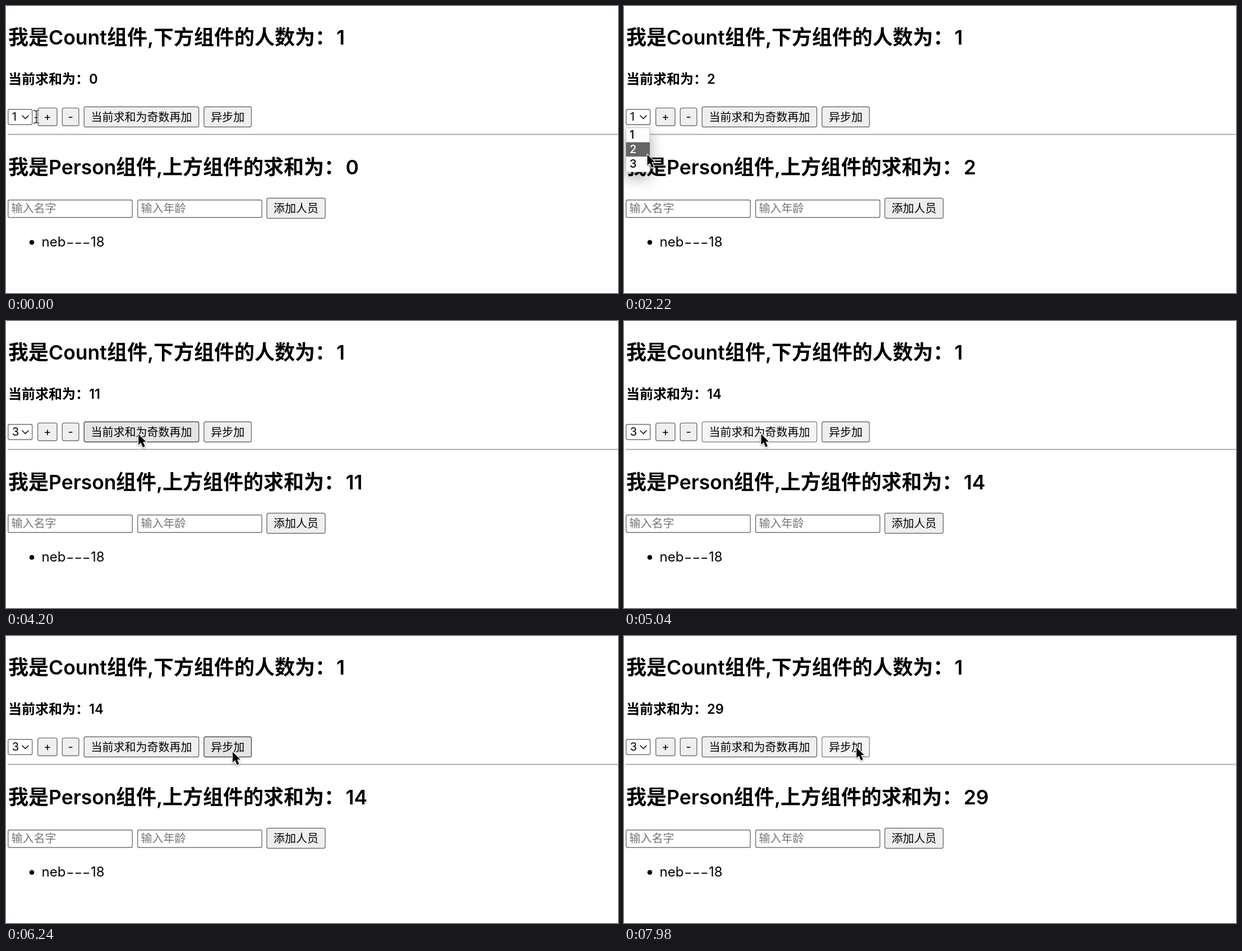
Animation of 1091x513 px, one loop 8 s. Source, as an HTML page:

```html
<!DOCTYPE html>
<html lang="zh-CN">
<head>
<meta charset="utf-8">
<title>Count / Person</title>
<style>
  html, body { margin: 0; width: 100%; height: 100%; overflow: hidden; background: #fff; }
  svg { display: block; width: 1091px; height: 513px; }
  text { font-family: Inter, "Noto Sans CJK SC", "Noto Sans CJK", sans-serif; font-size: 20px; white-space: pre; }
  .zh { font-family: "Noto Sans CJK SC", "Noto Sans CJK", sans-serif; }
  .h2 { font-size: 35.5px; font-weight: 600; }
  .h2.zh { font-size: 36px; font-weight: 700; }
  .h4 { font-size: 23.7px; font-weight: 600; }
  .h4.zh { font-size: 24px; font-weight: 700; }
  .li { font-size: 24px; }
  .dash { font-size: 22px; }
  .hint { fill: #757575; }
  .mid { text-anchor: middle; }
  .field { fill: #fff; stroke: #707070; stroke-width: 1.4; }
  .btn { fill: #efefef; stroke: #707070; stroke-width: 1.4; }
  .btn.hover { fill: #e5e5e5; stroke: #4f4f4f; }
  .btn.down { fill: #f5f5f5; stroke: #8d8d8d; }
  .panel { fill: #fff; stroke: #c4c4c4; filter: drop-shadow(0 10px 13px rgba(0, 0, 0, .32)); }
  #options { font-weight: 500; }
  #arrow { filter: drop-shadow(0 1.5px 1.5px rgba(0, 0, 0, .35)); }
  #beam { fill: none; stroke-linecap: round; }
</style>
</head>
<body>
<svg viewBox="0 0 1091 513">
  <defs>
    <path id="beamLine" d="M-4.5 -11.5Q0 -11.5 0 -8.5Q0 -11.5 4.5 -11.5M0 -8.5V8.5M-4.5 11.5Q0 11.5 0 8.5Q0 11.5 4.5 11.5M-3 1.5H3"/>
  </defs>

  <text class="h2 zh" x="4" y="69">我是</text>
  <text class="h2" x="76" y="69">Count</text>
  <text class="h2 zh" x="180" y="69">组件</text>
  <text class="h2" x="252" y="69">,</text>
  <text class="h2 zh" x="263" y="69">下方组件的人数为：</text>
  <text class="h2" x="589" y="69">1</text>

  <text class="h4 zh" x="4" y="138.5">当前求和为：</text>
  <text class="h4" id="sumTop" x="148" y="138.5"></text>

  <rect class="field" x="3.7" y="184.7" width="43" height="27.3" rx="2.5"/>
  <text id="step" x="10.8" y="205.3"></text>
  <path d="M28.5 195.5L34.5 201.3L40.5 195.5" fill="none" stroke="#111" stroke-width="1.6"/>
  <g id="buttons"></g>

  <path d="M3 229.6H1091" stroke="#989898" stroke-width="1.5"/>
  <path d="M3 231H1091" stroke="#ececec" stroke-width="1.2"/>

  <text class="h2 zh" x="4" y="301">我是</text>
  <text class="h2" x="76" y="301">Person</text>
  <text class="h2 zh" x="196" y="301">组件</text>
  <text class="h2" x="268" y="301">,</text>
  <text class="h2 zh" x="279" y="301">上方组件的求和为：</text>
  <text class="h2" id="sumLow" x="605.5" y="301"></text>

  <rect class="field" x="3.7" y="346.7" width="221.5" height="31.3" rx="2.5"/>
  <text class="zh hint" x="9.5" y="369.3">输入名字</text>
  <rect class="field" x="234.7" y="346.7" width="221.5" height="31.3" rx="2.5"/>
  <text class="zh hint" x="240.5" y="369.3">输入年龄</text>

  <circle cx="46" cy="422.5" r="4.3"/>
  <text class="li" x="63.5" y="430">neb</text>
  <text class="dash" x="107" y="430">−−−</text>
  <text class="li" x="151" y="430">18</text>

  <g id="menu">
    <rect class="panel" x="3.5" y="217.5" width="42.5" height="79" rx="2"/>
    <rect id="mark" x="3.5" width="42.5" height="25.7" fill="#666"/>
    <g id="options"></g>
  </g>

  <g id="beam">
    <use href="#beamLine" stroke="#fff" stroke-width="3.6"/>
    <use href="#beamLine" stroke="#222" stroke-width="1.5"/>
  </g>
  <g id="arrow">
    <path d="M0 0V19.2L4.3 15.1L7.9 23.3L11.6 21.7L8 13.7H13.6Z" stroke="#fff" stroke-width="2.6" stroke-linejoin="round" paint-order="stroke"/>
  </g>
</svg>
<script>
const LOOP = 8000, TICK = 60;
const $ = id => document.getElementById(id);

function add(parent, tag, attrs, text = '') {
  const el = document.createElementNS('http://www.w3.org/2000/svg', tag);
  for (const k in attrs) el.setAttribute(k, attrs[k]);
  el.textContent = text;
  parent.append(el);
  return el;
}

function addButton(label, x, w = label.length * 20 + 24.5, mid = 198.2) {
  const zh = label.length > 1, h = zh ? 36 : 31.6;
  const el = add($('buttons'), 'rect', { class: 'btn', x, y: mid - h / 2, width: w, height: h, rx: 3 });
  add($('buttons'), 'text', { class: zh ? 'zh mid' : 'mid', x: x + w / 2, y: mid + (zh ? 7.4 : 6.8) }, label);
  return { el, label, right: x + w, has: (px, py) => px > x && px < x + w && Math.abs(py - mid) < h / 2 };
}

const GAP = 9.3;
const plus = addButton('+', 56.7, 34.3);
const minus = addButton('-', plus.right + GAP, 29.6);
const odd = addButton('当前求和为奇数再加', minus.right + GAP);
const later = addButton('异步加', odd.right + GAP);
addButton('添加人员', 465, 104, 361.5);
const buttons = [plus, minus, odd, later];

const ROW = 25.7, MENU_TOP = 217.8;
const options = [1, 2, 3].map((n, i) =>
  add($('options'), 'text', { x: 10, y: MENU_TOP + ROW * i + 19.4 }, n));

// a visit: the pointer rests at x, y and clicks n times, first release at `first`
const PRESS = 120, RHYTHM = 180, REST = 60, LONGEST_MOVE = 900, DELAY = 900;
const open = { x: 34, y: 204, first: 1980, n: 1 };
const pick = { x: 43, y: 277, first: 2460, n: 1 };
const visits = [
  { on: plus, x: 73, y: 208, first: 300, n: 4 },
  { on: minus, x: 124, y: 205, first: 1440, n: 2 },
  open,
  pick,
  { on: plus, x: 73, y: 209, first: 2820, n: 3 },
  { on: odd, x: 244.5, y: 202, first: 4500, n: 1 },
  { on: odd, x: 244.5, y: 202, first: 5160, n: 2 },
  { on: later, x: 404, y: 207, first: 6060, n: 5 },
  { on: later, x: 414.5, y: 199, first: 8000, n: 1 }
];
for (const v of visits) {
  v.clicks = Array.from({ length: v.n }, (_, i) => v.first + i * RHYTHM);
  v.arrive = v.first - PRESS - REST;
  v.leave = v.clicks[v.n - 1] + REST;
}

const stepAt = t => t < pick.first ? 1 : 3;

function sumAt(t) {
  let sum = 0;
  for (const { on, clicks } of visits) {
    for (const click of on ? clicks : []) {
      const due = click + (on === later ? DELAY : 0);
      if (due > t || (on === odd && sum % 2 === 0)) continue;
      sum += stepAt(due) * (on === minus ? -1 : 1);
    }
  }
  return sum;
}

function pointerAt(t) {
  let from = { x: 54, y: 198, leave: 0 };
  for (const to of visits) {
    if (t < to.arrive) {
      const begin = Math.max(from.leave, to.arrive - LONGEST_MOVE);
      const u = Math.max(0, (t - begin) / (to.arrive - begin));
      const e = u * u * (3 - 2 * u);
      return [from.x + (to.x - from.x) * e, from.y + (to.y - from.y) * e];
    }
    from = to;
  }
  return [from.x, from.y];
}

const show = (id, on) => { $(id).style.display = on ? '' : 'none'; };

function draw(t) {
  const [x, y] = pointerAt(t);
  const menuOpen = t >= open.first && t < pick.first;
  const beam = t < TICK;

  $('sumTop').textContent = $('sumLow').textContent = sumAt(t);
  $('step').textContent = stepAt(t);

  for (const b of buttons) {
    const down = visits.some(v => v.on === b && v.clicks.some(c => t >= c - PRESS && t < c));
    const hover = !beam && !menuOpen && b.has(x, y);
    b.el.setAttribute('class', 'btn' + (down ? ' down' : hover ? ' hover' : ''));
  }

  const row = Math.max(0, Math.min(2, Math.floor((y - MENU_TOP) / ROW)));
  $('mark').setAttribute('y', MENU_TOP + row * ROW);
  options.forEach((o, i) => o.setAttribute('fill', i === row ? '#fff' : '#000'));

  show('menu', menuOpen);
  show('beam', beam);
  show('arrow', !beam);
  for (const id of ['beam', 'arrow']) $(id).setAttribute('transform', `translate(${x} ${y})`);
}

const start = performance.now();
function loop() {
  const t = (performance.now() - start) % LOOP;
  draw(Math.floor(t / TICK) * TICK);
  requestAnimationFrame(loop);
}
draw(0);
requestAnimationFrame(loop);
</script>
</body>
</html>
```
